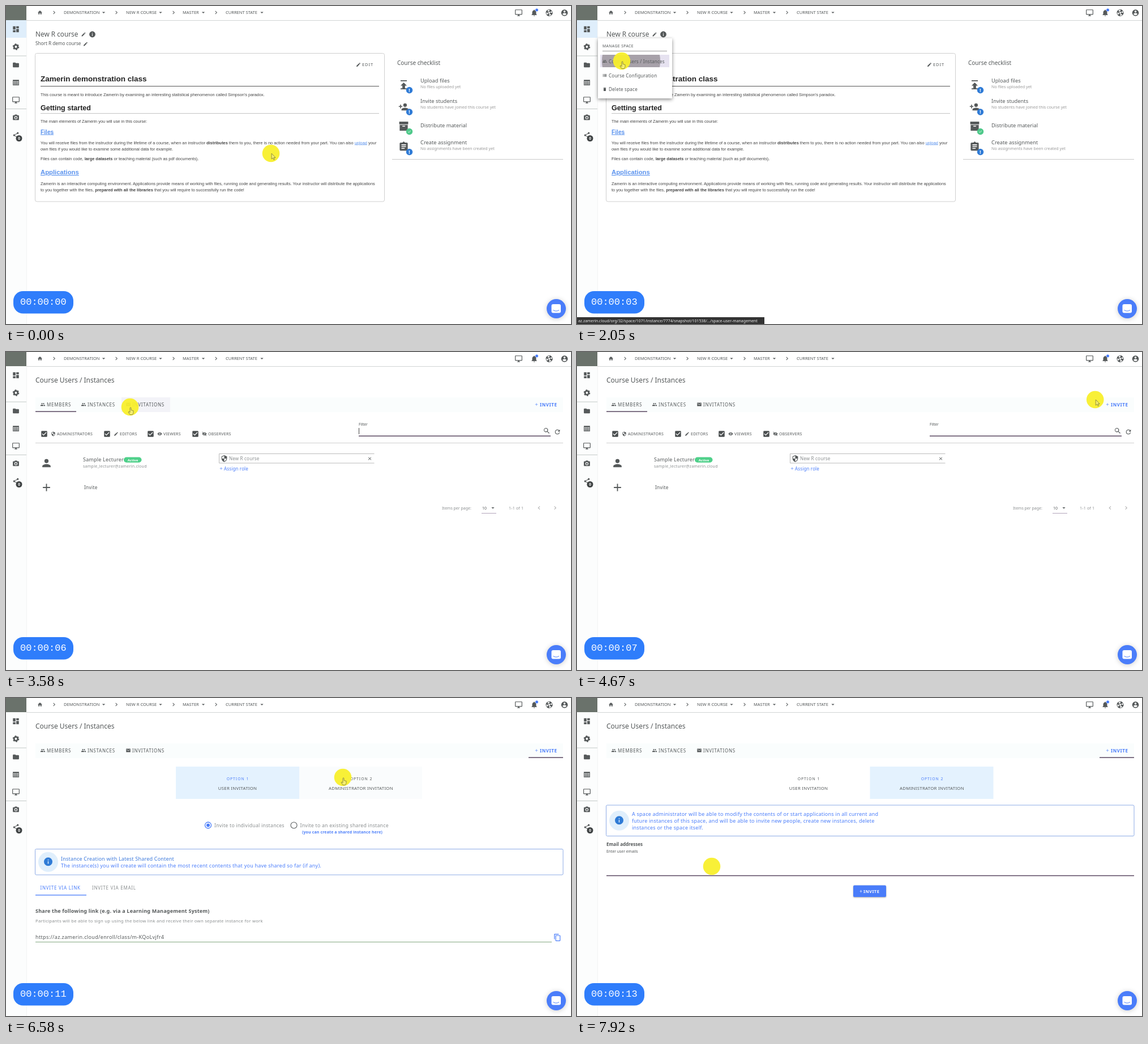
Recreate the animation shown at these times as an HTML page. Size 998 by 561 pixels, loop 8 s.

```html
<!DOCTYPE html>
<html lang="en">
<head>
<meta charset="utf-8">
<title>Course invitation walkthrough</title>
<style>
  html, body { margin: 0; width: 100%; height: 100%; overflow: hidden; background: #fff; }
  svg { display: block; width: 100%; height: 100%; font-family: "Noto Sans", sans-serif; }
  .arial { font-family: "Liberation Sans", Arial, sans-serif; }
  .mono { font-family: "Liberation Mono", monospace; }
  .link { fill: #5b93ee; text-decoration: underline; }
  text { white-space: pre; }
</style>
</head>
<body>
<svg id="stage" viewBox="0 0 998 561"></svg>
<script>
const LOOP = 8000;
const INK = '#55595a', GREY = '#8b8f90', BLUE = '#4a7dfa', PURPLE = '#594760', SKY = '#e4f2fe';

// Icon outlines on a 24 x 24 grid
const ICONS = {
  dashboard: 'M3 13h8V3H3zm0 8h8v-6H3zm10 0h8V11h-8zm0-18v6h8V3z',
  folder: 'M10 4H4a2 2 0 0 0-2 2v12a2 2 0 0 0 2 2h16a2 2 0 0 0 2-2V8a2 2 0 0 0-2-2h-8z',
  table: 'M2 3h20v18H2zM4 8v3h4V8zm6 0v3h4V8zm6 0v3h4V8zM4 13v2h4v-2zm6 0v2h4v-2zm6 0v2h4v-2zM4 17v2h4v-2zm6 0v2h4v-2zm6 0v2h4v-2z',
  monitor: 'M21 2H3a2 2 0 0 0-2 2v12a2 2 0 0 0 2 2h7v2H8v2h8v-2h-2v-2h7a2 2 0 0 0 2-2V4a2 2 0 0 0-2-2zm0 14H3V4h18z',
  camera: 'M9 2L7.2 4H4a2 2 0 0 0-2 2v12a2 2 0 0 0 2 2h16a2 2 0 0 0 2-2V6a2 2 0 0 0-2-2h-3.2L15 2zM12 17a5 5 0 1 1 0-10 5 5 0 0 1 0 10zm0-2a3 3 0 1 0 0-6 3 3 0 0 0 0 6z',
  share: 'M18 2a3 3 0 1 1-2 5.200L9 11.300v1.400l7 4.100a3 3 0 1 1-1 1.600l-7-4a3 3 0 1 1 0-4.800l7-4A3 3 0 0 1 18 2z',
  home: 'M10 20v-6h4v6h5v-8h3L12 3 2 12h3v8z',
  bell: 'M12 22a2 2 0 0 0 2-2h-4a2 2 0 0 0 2 2zm6-6v-5c0-3-1.600-5.600-4.500-6.300V4a1.500 1.500 0 0 0-3 0v.7C7.600 5.400 6 8 6 11v5l-2 2v1h16v-1z',
  account: 'M12 2a10 10 0 1 0 0 20 10 10 0 0 0 0-20zm0 3a3 3 0 1 1 0 6 3 3 0 0 1 0-6zm0 14.200a7.200 7.200 0 0 1-6-3.200c0-2 4-3.100 6-3.100s6 1.100 6 3.100a7.200 7.200 0 0 1-6 3.200z',
  pencil: 'M3 17.250V21h3.750L17.800 9.900l-3.750-3.750zM20.700 7a1 1 0 0 0 0-1.400l-2.300-2.300a1 1 0 0 0-1.400 0l-1.900 1.800 3.750 3.750z',
  info: 'M12 2a10 10 0 1 0 0 20 10 10 0 0 0 0-20zm1 15h-2v-6h2zm0-8h-2V7h2z',
  person: 'M12 12a4 4 0 1 0 0-8 4 4 0 0 0 0 8zm0 2c-2.700 0-8 1.300-8 4v2h16v-2c0-2.700-5.300-4-8-4z',
  addPerson: 'M15 12a4 4 0 1 0 0-8 4 4 0 0 0 0 8zm-9-2V7H4v3H1v2h3v3h2v-3h3v-2zm9 4c-2.700 0-8 1.300-8 4v2h16v-2c0-2.700-5.300-4-8-4z',
  people: 'M8 11a3 3 0 1 0 0-6 3 3 0 0 0 0 6zm8 0a3 3 0 1 0 0-6 3 3 0 0 0 0 6zm-8 2c-2.300 0-7 1.200-7 3.500V19h14v-2.500C15 14.200 10.300 13 8 13zm8 0 1 3.500V19h6v-2.500c0-2.300-4.700-3.500-7-3.500z',
  upload: 'M5 4v-2h14v2zm0 10h4v6h6v-6h4l-7-7zM5 20h14v2H5z',
  archive: 'M2 2h20v6H2zm1 7h18v13H3zm6 2v2h6v-2z',
  clipboard: 'M19 3h-4.200a3 3 0 0 0-5.600 0H5a2 2 0 0 0-2 2v14a2 2 0 0 0 2 2h14a2 2 0 0 0 2-2V5a2 2 0 0 0-2-2zM7 7h10v2H7zm0 4h10v2H7zm0 4h7v2H7z',
  shield: 'M12 1L3 5v6c0 5.500 3.800 10.700 9 12 5.200-1.300 9-6.500 9-12V5zm0 11h7c-.5 4-3.300 7.800-7 9V12H5V6.300l7-3.100z',
  eye: 'M12 4.500C7 4.500 2.700 7.600 1 12a11.800 11.800 0 0 0 22 0c-1.700-4.400-6-7.500-11-7.500zM12 17a5 5 0 1 1 0-10 5 5 0 0 1 0 10zm0-2a3 3 0 1 0 0-6 3 3 0 0 0 0 6z',
  search: 'M15.500 14h-.8A6.500 6.500 0 1 0 14 14.700v.8l5 5 1.500-1.500zm-6 0a4.500 4.500 0 1 1 0-9 4.500 4.500 0 0 1 0 9z',
  refresh: 'M17.650 6.350A8 8 0 1 0 19.730 14h-2.080A6 6 0 1 1 16.200 7.800L13 11h7V4z',
  copy: 'M16 1H4a2 2 0 0 0-2 2v14h2V3h12zm3 4H8a2 2 0 0 0-2 2v14a2 2 0 0 0 2 2h11a2 2 0 0 0 2-2V7a2 2 0 0 0-2-2zm0 16H8V7h11z',
  mail: 'M2 4h20v16H2zm2 3v2l8 5 8-5V7l-8 5z',
  trash: 'M6 19a2 2 0 0 0 2 2h8a2 2 0 0 0 2-2V7H6zM19 4h-3.500l-1-1h-5l-1 1H5v2h14z',
  list: 'M2 5h4v3H2zm6 0h14v3H8zM2 10.500h4v3H2zm6 0h14v3H8zM2 16h4v3H2zm6 0h14v3H8z',
  check: 'M9 16.200L4.800 12l-1.400 1.400L9 19 21 7l-1.400-1.400z',
  checkbox: 'M19 3H5a2 2 0 0 0-2 2v14a2 2 0 0 0 2 2h14a2 2 0 0 0 2-2V5a2 2 0 0 0-2-2zm-9 14l-5-5 1.400-1.400 3.600 3.600 7.600-7.600L19 8z',
  plus: 'M19 13h-6v6h-2v-6H5v-2h6V5h2v6h6z',
  close: 'M19 6.400L17.600 5 12 10.600 6.400 5 5 6.400l5.600 5.600L5 17.600 6.400 19l5.600-5.600 5.600 5.600 1.400-1.400-5.600-5.600z',
  next: 'M10 6L8.600 7.400l4.600 4.600-4.600 4.600L10 18l6-6z',
  prev: 'M15.400 7.400L14 6l-6 6 6 6 1.400-1.400-4.600-4.600z',
  down: 'M5 9l7 7 7-7z'
};

const icon = (name, cx, cy, size, color = INK) =>
  `<path d="${ICONS[name]}" fill="${color}" fill-rule="evenodd" transform="translate(${cx - size / 2} ${cy - size / 2}) scale(${size / 24})"/>`;

const text = (x, y, size, str, { color = INK, weight = 400, gap = 0, anchor = 'start', cls = '' } = {}) =>
  `<text x="${x}" y="${y}" font-size="${size}" fill="${color}" font-weight="${weight}" letter-spacing="${gap}" text-anchor="${anchor}" class="${cls}">${str}</text>`;

const rect = (x, y, w, h, fill, extra = '') =>
  `<rect x="${x}" y="${y}" width="${w}" height="${h}" fill="${fill}" ${extra}/>`;

const circle = (cx, cy, r, fill, extra = '') =>
  `<circle cx="${cx}" cy="${cy}" r="${r}" fill="${fill}" ${extra}/>`;

const group = (id, ...parts) => `<g id="${id}">${parts.join('')}</g>`;

const crumb = (x, label, arrowX) =>
  text(x, 14, 7.5, label, { weight: 500 }) + icon('down', arrowX, 11.500, 9);

const frame = [
  rect(0, 25, 36, 536, '#fcfdfd'),
  rect(36, 25, 962, 1, '#d2d4d4'),
  rect(36, 26, .7, 535, '#eef0f0'),
  group('activeNav', rect(0, 25, 36, 31, '#dfeefb')),
  rect(0, 0, 36, 25, '#6a726b'),
  icon('home', 60, 11.500, 9.500),
  [85, 195, 296, 371].map(x => icon('next', x, 11.500, 12)).join(''),
  crumb(102, 'DEMONSTRATION', 172.500), crumb(212, 'NEW R COURSE', 273),
  crumb(312, 'MASTER', 348.500), crumb(388, 'CURRENT STATE', 452),
  icon('monitor', 905.500, 12, 14), icon('bell', 933, 12, 14), circle(937.500, 7, 2.500, BLUE),
  circle(959.500, 12, 4, 'none', `stroke="${INK}" stroke-width="4" stroke-dasharray="3.140 3.140"`),
  circle(959.500, 12, 5.500, 'none', `stroke="${INK}" stroke-width="1"`),
  circle(959.500, 12, 2.200, 'none', `stroke="${INK}" stroke-width="1"`),
  icon('account', 986.500, 12, 14),
  icon('dashboard', 17.500, 41, 14),
  circle(17.500, 72, 3.300, 'none', `stroke="${INK}" stroke-width="2.800"`),
  circle(17.500, 72, 5, 'none', `stroke="${INK}" stroke-width="1.600" stroke-dasharray="2.618"`),
  rect(0, 87.500, 36, 1, '#c4cac8'),
  icon('folder', 17.500, 104, 13), icon('table', 17.500, 135, 13), icon('monitor', 17.500, 166, 14),
  rect(0, 181, 36, 1, '#c4cac8'),
  icon('camera', 17.500, 197, 13), icon('share', 17.500, 228, 13),
  circle(23, 233.500, 5.500, '#3f4344'),
  text(23, 236, 6.500, '0', { color: '#fff', anchor: 'middle', weight: 600 })
].join('');

const body = (y, str) => text(61, y, 7.400, str, { color: '#444', cls: 'arial' });
const heading = (y, size, str, cls = '') => text(61, y, size, str, { color: '#222', weight: 700, cls: 'arial ' + cls });
const bold = str => `<tspan font-weight="700">${str}</tspan>`;

const badge = (y, done) => circle(712.500, y, 5.700, done ? '#4fc98a' : '#2f7bd6') +
  (done ? icon('check', 712.500, y, 7, '#fff')
        : text(712.500, y + 3, 8, '!', { color: '#fff', weight: 700, anchor: 'middle' }));

const task = (name, iconY, badgeY, titleY, title, note) =>
  icon(name, 702.500, iconY, 19) + badge(badgeY, !note) +
  text(732, titleY, 9.300, title, { weight: 500 }) +
  (note ? text(732, titleY + 10, 7.200, note, { color: '#999' }) : '');

const dashboard = group('dashboard',
  text(52, 53.500, 11.800, 'New R course', { weight: 500 }), icon('pencil', 137, 50, 9), icon('info', 152.500, 50, 13),
  text(52, 69, 8.200, 'Short R demo course'), icon('pencil', 140.500, 67, 9),
  rect(51.500, 83.500, 617, 261.500, '#fff', 'rx="3" stroke="#cfcfcf"'),
  icon('pencil', 622.500, 103.500, 9), text(629, 106, 7.500, 'EDIT', { gap: .9 }),
  heading(133, 13.500, 'Zamerin demonstration class'), rect(61, 141, 598, 1, '#555'),
  body(158.500, "This course is meant to introduce Zamerin by examining an interesting statistical phenomenon called Simpson's paradox."),
  heading(184, 12.500, 'Getting started'), rect(61, 189, 598, 1, '#c4c4c4'),
  body(205.500, 'The main elements of Zamerin you will use in this course:'),
  heading(225.500, 10.200, 'Files', 'link'),
  body(243.500, `You will receive files from the instructor during the lifetime of a course, when an instructor ${bold('distributes')} them to you, there is no action needed from your part. You can also <tspan class="link">upload</tspan> your`),
  body(254.500, 'own files if you would like to examine some additional data for example.'),
  body(271.500, `Files can contain code, ${bold('large datasets')} or teaching material (such as pdf documents).`),
  heading(297, 11.300, 'Applications', 'link'),
  body(316, 'Zamerin is an interactive computing environment. Applications provide means of working with files, running code and generating results. Your instructor will distribute the applications'),
  body(327, `to you together with the files, ${bold('prepared with all the libraries')} that you will require to successfully run the code!`),
  text(691, 104, 10, 'Course checklist', { weight: 500 }),
  task('upload', 139, 148.500, 135, 'Upload files', 'No files uploaded yet'),
  task('addPerson', 178, 187, 171, 'Invite students', 'No students have joined this course yet'),
  task('archive', 212, 221.500, 213.500, 'Distribute material'),
  task('clipboard', 248, 257.500, 243.500, 'Create assignment', 'No assignments have been created yet'),
  rect(682, 270, 302, 1, '#c9c9c9'));

const menuItem = (name, y, label) => icon(name, 49, y, 8) + text(56, y + 3, 8.100, label, { gap: .2 });

const menu = group('menu',
  rect(37, 57, 131, 106, '#fff', 'style="filter:drop-shadow(0 2px 3px #0007)"'),
  text(45, 73, 6.800, 'MANAGE SPACE', { gap: .4 }), rect(45, 79, 114, 1, '#999'),
  group('hoverRow', rect(41, 86, 122, 22, '#e6e2f0')),
  '<clipPath id="rowClip"><rect x="41" y="86" width="122" height="22"/></clipPath>',
  '<g clip-path="url(#rowClip)"><circle id="ripple" cx="95.500" cy="97" fill="#8d878c" opacity=".7"/></g>',
  menuItem('people', 97.500, 'Course Users / Instances'),
  menuItem('list', 122.500, 'Course Configuration'),
  menuItem('trash', 147, 'Delete space'));

const tab = (name, x, label) =>
  icon(name, x, 92.500, 9) + text(x + 7, 95.500, 8, label, { gap: .75 });

const tabs = group('tabs',
  text(52, 53.500, 12, 'Course Users / Instances', { weight: 500 }),
  rect(52, 80, 932, 26, '#fafdfd'),
  group('tabHover', rect(204, 80, 86, 26, '#f3f3f8')),
  tab('people', 65, 'MEMBERS'), tab('people', 137, 'INSTANCES'), tab('mail', 216, 'INVITATIONS'),
  icon('plus', 937, 92.500, 8, BLUE), text(943, 95.500, 8, 'INVITE', { color: BLUE, weight: 700, gap: .6 }),
  `<rect id="inkBar" y="104.300" height="1.500" fill="${PURPLE}"/>`);

const filter = (x, name, label) =>
  icon('checkbox', x, 144.500, 14, '#4b4f50') + icon(name, x + 16, 144.500, 8.500) +
  text(x + 22.500, 146.800, 7, label, { gap: .25 });

const members = group('members',
  filter(67.500, 'shield', 'ADMINISTRATORS'), filter(178.500, 'pencil', 'EDITORS'),
  filter(255.500, 'eye', 'VIEWERS'), filter(334.500, 'eye', 'OBSERVERS'),
  `<path d="M346.500 141l7.500 7" stroke="${INK}"/>`,
  text(623, 130, 6.700, 'Filter'), rect(623, 147.500, 339, 1.500, PURPLE),
  icon('search', 955, 139, 14), icon('refresh', 974, 141, 13),
  group('caret', rect(623, 134, 1, 11, '#444')),
  rect(52, 160, 932, 1, '#cfcfcf'),
  icon('person', 71.500, 196, 22),
  text(136, 193, 9, 'Sample Lecturer', { gap: .2 }),
  rect(208, 185.500, 31.500, 9.500, '#4fd08a', 'rx="4.700"'),
  text(224, 192.500, 6, 'Active', { color: '#fff', weight: 600, anchor: 'middle' }),
  text(136, 204, 7, 'sample_lecturer@zamerin.cloud', { color: GREY, gap: .25 }),
  `<path d="M650.500 179.500H376.500V196H650.500" fill="none" stroke="#bbb"/>`,
  icon('shield', 385.500, 188, 13), text(394, 191, 8, 'New R course', { color: GREY, gap: .2 }),
  icon('close', 642.500, 188, 9),
  icon('plus', 380, 205.500, 8, BLUE), text(385, 208.500, 8, 'Assign role', { color: BLUE, gap: .15 }),
  icon('plus', 71.500, 239, 22), text(138, 242, 8.300, 'Invite', { gap: .3 }),
  text(770, 277.500, 7, 'Items per page:', { color: GREY }), text(841, 277.500, 7, '10'),
  icon('down', 860, 275, 9), rect(840, 284, 26, 1, '#b3a5bb'),
  text(888, 277.500, 7, '1-1 of 1', { color: GREY, gap: .2 }),
  icon('prev', 941.500, 275, 12, '#aaa'), icon('next', 970, 275, 12, '#aaa'));

const option = (n, cx, label) =>
  `<text id="option${n}" x="${cx + .5}" y="144.500" font-size="6.800" letter-spacing="1" font-weight="500" text-anchor="middle">OPTION ${n}</text>` +
  text(cx, 162, 7.800, label, { gap: .28, anchor: 'middle' });

const notice = (y, h) => rect(51.500, y, 932.500, h, '#fff', 'rx="2" stroke="#8eace6"') +
  circle(74.500, y + h / 2, 17.500, '#e0effc') + icon('info', 74.500, y + h / 2 - .5, 18, '#2f7bd6');
const noticeText = (y, str) => text(97, y, 9, str, { color: BLUE, gap: .23 });

const options = group('options',
  group('optionHover', rect(518, 121, 217, 57, '#fafcfd')),
  `<rect id="optionTint" y="121" width="218" height="57" fill="${SKY}"/>`,
  option(1, 409, 'USER INVITATION'), option(2, 627, 'ADMINISTRATOR INVITATION'));

const userInvite = group('userInvite',
  circle(357, 224.500, 5.500, 'none', `stroke="${BLUE}" stroke-width="1.300"`), circle(357, 224.500, 3, BLUE),
  text(368, 228, 8.700, 'Invite to individual instances', { color: GREY, gap: .25 }),
  circle(508.500, 224.500, 5.500, 'none', `stroke="${INK}" stroke-width="1.100"`),
  text(519.500, 228, 8.700, 'Invite to an existing shared instance', { color: GREY, gap: .25 }),
  text(523, 239, 6.900, '(you can create a shared instance here)', { color: BLUE, weight: 600, gap: .18 }),
  notice(266.500, 45.500),
  text(97, 286.500, 9, 'Instance Creation with Latest Shared Content', { color: '#3a78dc', weight: 500, gap: .2 }),
  noticeText(298.500, 'The instance(s) you will create will contain the most recent contents that you have shared so far (if any).'),
  text(60.500, 338, 8, 'INVITE VIA LINK', { color: BLUE, gap: .75 }),
  text(152, 338, 8, 'INVITE VIA EMAIL', { color: GREY, gap: .75 }),
  rect(52, 347, 90, 1.300, BLUE),
  text(52, 379, 9, 'Share the following link (e.g. via a Learning Management System)', { weight: 600, gap: .2 }),
  text(52, 395.500, 7.700, 'Participants will be able to sign up using the below link and receive their own separate instance for work', { color: GREY, gap: .25 }),
  text(52, 424.500, 9, 'https://az.zamerin.cloud/enroll/class/m-KQoLvjfr4', { gap: .35 }),
  rect(52, 430, 912, 1, '#83a882'), icon('copy', 974, 422.500, 14, BLUE));

const adminInvite = group('adminInvite',
  notice(189, 54.500),
  noticeText(208, 'A space administrator will be able to modify the contents of or start applications in all current and'),
  noticeText(220, 'future instances of this space, and will be able to invite new people, create new instances, delete'),
  noticeText(232, 'instances or the space itself.'),
  text(52, 261, 8, 'Email addresses', { weight: 600 }), text(52, 273, 6.800, 'Enter user emails'),
  rect(52, 313, 932, 1, '#aaa'),
  `<rect id="emailLine" y="312.700" height="1.500" fill="${PURPLE}"/>`,
  rect(488, 330.500, 58, 20.500, BLUE, 'rx="2" style="filter:drop-shadow(0 1px 1px #0005)"'),
  icon('plus', 501.500, 341, 8, '#fff'),
  text(506, 343.500, 7.500, 'INVITE', { color: '#fff', weight: 700, gap: .5 }));

const overlay = [
  group('status', rect(0, 549, 331, 12, '#333'),
    text(2, 558, 6.900, 'az.zamerin.cloud/org/32/space/1071/instance/7774/snapshot/101538/.../space-user-management', { color: '#eee' })),
  rect(13, 503, 106, 39.500, '#2f7dfb', 'rx="17"'),
  `<text id="clock" class="mono" x="25" y="526.500" font-size="17" fill="#fff"></text>`,
  circle(972, 534, 17, BLUE, 'style="filter:drop-shadow(0 1px 4px #0003)"'),
  rect(963.500, 526, 16.500, 15.500, '#fff', 'rx="3"'),
  `<path d="M966.500 536.500q5.300 3.300 10.500 0" fill="none" stroke="${BLUE}"/>`,
  group('pointer', circle(0, 0, 15.300, '#f8ef2c', 'opacity=".95"'),
    '<path id="arrow" d="M1 0v10l2.300-2 1.700 3.500 1.500-.7-1.600-3.300H8z" fill="#f5ee70" stroke="#7d7a35" stroke-width=".8"/>',
    '<path id="hand" d="M0 1.500q1-1.500 2 0v4l4 1v4l-1.500 3H0l-3-4.500 1-1 2 1.500z" fill="#f5ee70" stroke="#7d7a35" stroke-width=".8"/>')
].join('');

document.getElementById('stage').innerHTML =
  rect(0, 0, 998, 561, '#fff') + frame + dashboard + tabs + members + options + userInvite + adminInvite + menu + overlay;

const $ = id => document.getElementById(id);
const set = (id, attrs) => Object.entries(attrs).forEach(([k, v]) => $(id).setAttribute(k, v));
const show = (id, opacity) => set(id, { opacity: Number(opacity) });

const between = (t, from, to) => t >= from && t < to;
const ramp = (t, from, to) => Math.min(1, Math.max(0, (t - from) / (to - from)));
const ease = (t, from, to) => { const p = ramp(t, from, to); return p * p * (3 - 2 * p); };
const mix = (a, b, p) => a + (b - a) * p;

const TICKS = [490, 1090, 1680, 2290, 2890, 3500, 4060, 4690, 5300, 5920, 6580, 7180, 7790];

// Pointer stops: time, x, y
const PATH = [
  [0, 468, 260], [90, 468, 260], [250, 375, 215], [450, 110, 100], [630, 18, 68],
  [1150, 18, 68], [1320, 50, 86], [1480, 79, 97], [2810, 79, 97], [3050, 219, 97],
  [4200, 219, 97], [4320, 340, 86], [4480, 660, 77], [4670, 915, 84], [4800, 946, 91], [4940, 953, 92],
  [5250, 953, 92], [5400, 850, 82], [5570, 673, 73], [5700, 630, 70], [5840, 612, 77], [6000, 600, 115],
  [6180, 595, 140], [6900, 595, 140], [7060, 530, 175], [7350, 310, 275], [7560, 238, 297], [LOOP, 238, 297]
];

function pointerAt(t) {
  const i = PATH.findIndex(stop => stop[0] > t);
  const [t0, x0, y0] = PATH[i - 1], [t1, x1, y1] = PATH[i];
  const p = ramp(t, t0, t1);
  return [mix(x0, x1, p), mix(y0, y1, p)];
}

function draw(t) {
  const usersPage = t >= 2250, invitePage = t >= 5080, admin = ease(t, 6800, 6980);
  show('activeNav', !usersPage);
  show('dashboard', !usersPage);
  show('menu', between(t, 1110, 2200));
  show('hoverRow', t >= 1400);
  show('status', between(t, 1420, 2400));
  set('ripple', { r: 51 * Math.max(0, t - 1970) / 80 });

  show('tabs', usersPage);
  show('tabHover', between(t, 3020, 4240));
  show('members', invitePage ? 0 : ease(t, 2300, 2600));
  show('caret', t >= 2975 && Math.floor((t - 2975) / 300) % 2 === 0);
  const slide = ease(t, 5050, 5400);
  set('inkBar', { x: mix(52, 923, slide), width: mix(72, 61, slide) });

  const inviteIn = ease(t, 5080, 5300);
  show('options', inviteIn);
  show('optionHover', between(t, 6080, 6800));
  set('optionTint', { x: admin < .5 ? 300 : 517.500, opacity: Math.abs(1 - 2 * admin) });
  set('option1', { fill: admin < .5 ? BLUE : INK });
  set('option2', { fill: admin < .5 ? INK : BLUE });
  show('userInvite', admin < .5 ? inviteIn : 0);
  show('adminInvite', ease(t, 6890, 7050));
  const focus = ease(t, 7610, 7850);
  set('emailLine', { x: 518 - 466 * focus, width: 932 * focus });

  const [x, y] = pointerAt(t);
  set('pointer', { transform: `translate(${x} ${y})` });
  const hand = [[560, 2700], [3000, 4300], [4750, 5300], [6080, 6950]].some(([a, b]) => between(t, a, b));
  show('hand', hand);
  show('arrow', !hand && t < 7500);

  const seconds = TICKS.filter(tick => tick <= t).length;
  $('clock').textContent = '00:00:' + String(seconds).padStart(2, '0');
}

function loop() {
  draw(performance.now() % LOOP);
  requestAnimationFrame(loop);
}
loop();
</script>
</body>
</html>
```
